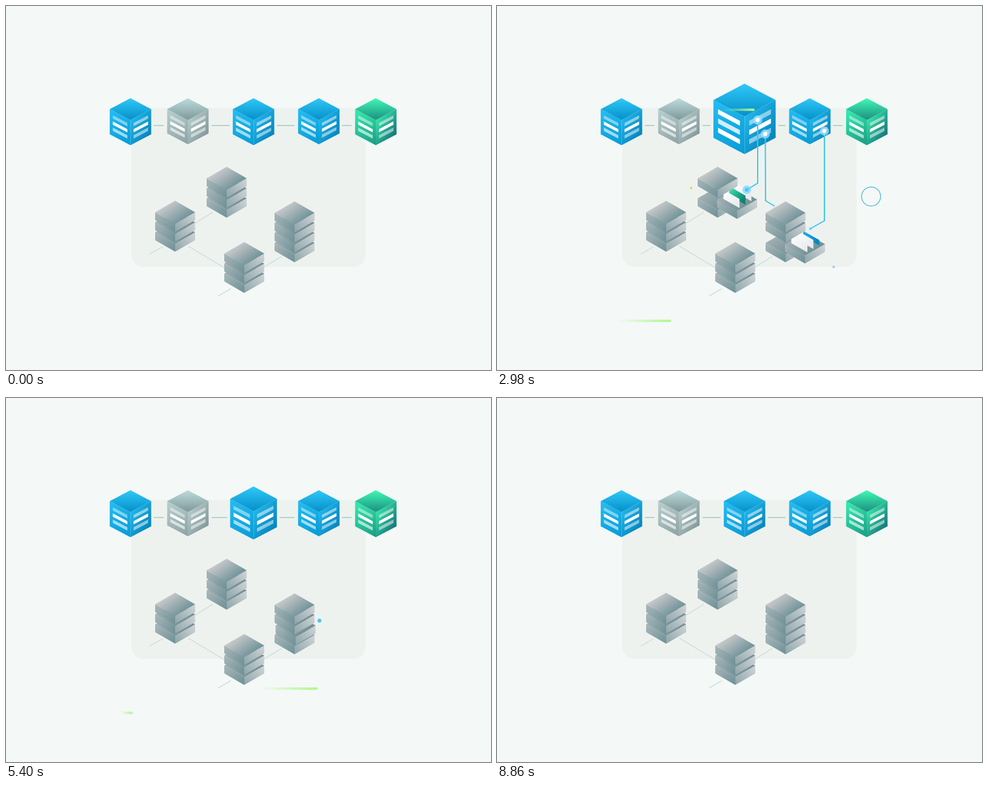
These frames come from a looping animation (800 px wide and 600 px high, 8880 ms). An HTML page with a canvas:

```html
<!DOCTYPE html>
<html lang="en">
<head>
<meta charset="utf-8">
<title>Blocks and storage</title>
<style>
html, body { margin: 0; width: 100%; height: 100%; overflow: hidden; background: #f4f8f7; }
canvas { display: block; width: 800px; height: 600px; }
</style>
</head>
<body>
<canvas id="stage" width="800" height="600"></canvas>
<script>
const ctx = document.getElementById('stage').getContext('2d');
const LOOP = 8880;
const TAU = Math.PI * 2;

const clamp = v => Math.max(0, Math.min(1, v));
const mix = (a, b, k) => a + (b - a) * k;
const ease = v => { const k = clamp(v); return k * k * (3 - 2 * k); };
const step = (t, a, b) => ease((t - a) / (b - a));
const between = (t, inA, inB, outA, outB) => step(t, inA, inB) - step(t, outA, outB);

// Palette entries are [from, to] pairs for each face
const BLUE = { top: ['#2fc8f8', '#058fc9'], left: ['#24bdf3', '#069bd6'], right: ['#22b5ea', '#0584bb'] };
const GRAY = { top: ['#bddcdc', '#7f9898'], left: ['#b9cfcf', '#8da3a4'], right: ['#b4caca', '#83989a'] };
const GREEN = { top: ['#3ff8b5', '#1c8f80'], left: ['#36eeb0', '#1a9c83'], right: ['#35e4a8', '#17747a'] };
const STEEL = { top: ['#cacacc', '#6f9298'], left: ['#a9b7ba', '#6c9096'], right: ['#d2d5d7', '#8da5a9'] };

function poly(points, fill) {
  ctx.beginPath();
  points.forEach(([x, y]) => ctx.lineTo(x, y));
  ctx.closePath();
  ctx.fillStyle = fill;
  ctx.fill();
}

function shade(a, b, [from, to]) {
  const g = ctx.createLinearGradient(a[0], a[1], b[0], b[1]);
  g.addColorStop(0, from);
  g.addColorStop(1, to);
  return g;
}

function line(points, color, width) {
  ctx.beginPath();
  points.forEach(([x, y]) => ctx.lineTo(x, y));
  ctx.strokeStyle = color;
  ctx.lineWidth = width;
  ctx.stroke();
}

function disc(x, y, r, color) {
  if (r <= 0) return;
  ctx.beginPath();
  ctx.arc(x, y, r, 0, TAU);
  ctx.fillStyle = color;
  ctx.fill();
}

function cube(cx, cy, size, height, colors, turn = 0, marks = [[.45, 1, .6], [.5, 1, .5]]) {
  const h = height * size;
  const v = [0, 1, 2, 3].map(i => {
    const a = turn + (i + 1) * Math.PI / 2;
    return [cx + 34.2 * size * Math.cos(a), cy + 18 * size * Math.sin(a)];
  });
  const topY = Math.min(...v.map(p => p[1]));
  const lowY = Math.max(...v.map(p => p[1]));
  v.forEach((b, i) => {
    const a = v[(i + 1) % 4];
    if (a[0] >= b[0] - .01) return;
    const isLeft = a[0] + b[0] < 2 * cx;
    poly([a, b, [b[0], b[1] + h], [a[0], a[1] + h]],
      shade(a, [b[0], b[1] + h], isLeft ? colors.left : colors.right));
    marks[isLeft ? 0 : 1].forEach((alpha, row) => {
      const at = (u, w) => [mix(a[0], b[0], u), mix(a[1], b[1], u) + h * w];
      const y = .18 + row * .245;
      poly([at(.15, y), at(.85, y), at(.85, y + .13), at(.15, y + .13)], `rgba(255,255,255,${alpha})`);
    });
  });
  poly(v, shade([cx, topY], [cx, lowY], colors.top));
}

function slab(cx, y, isLid) {
  const back = [cx, y], left = [cx - 33, y + 19], front = [cx, y + 38], right = [cx + 33, y + 19];
  const down = ([x, py]) => [x, py + 13];
  poly([left, front, down(front), down(left)], shade(left, down(front), STEEL.left));
  poly([front, right, down(right), down(front)], shade(right, down(front), STEEL.right));
  poly([back, right, front, left],
    shade([cx - 13, y + 4], [cx + 10, y + 36], isLid ? STEEL.top : ['#a3b0b2', '#718f95']));
}

function sheet(x, y, rise, colors) {
  const h = 15 * rise;
  if (h < .3) return;
  const base = y + 15;
  poly([[x, base - h], [x + 26.5, base + 15 - h], [x + 26.5, base + 15], [x, base]],
    shade([x, y], [x + 26, y + 18], colors));
}

const WHITE = ['#ffffff', '#e9edee'];
const MINT = ['#38ecae', '#0f8473'];
const AZURE = ['#22b9f2', '#0787c4'];

function server(cx, top, layers, drawer, open = 0, sheets = [], rise = []) {
  for (let i = layers - 1; i >= 0; i--) {
    const k = i === drawer ? open : 0;
    slab(cx + 32 * k, top + 16.5 * i + 18.5 * k, i === 0);
    if (k) {
      for (let j = sheets.length - 1; j >= 0; j--) {
        sheet(cx + 9.5 + j * 9.8 - 32 * (1 - k), top + 38 + 16 * (drawer - 1) - j * 5.6 - 18.5 * (1 - k),
          rise[j], sheets[j]);
      }
    }
  }
}

// Draws the part of a polyline between two fractions of its length
function trim(points, from, to, color) {
  if (to <= from) return;
  const lens = points.slice(1).map((p, i) => Math.hypot(p[0] - points[i][0], p[1] - points[i][1]));
  const total = lens.reduce((a, b) => a + b, 0);
  const a = from * total, b = to * total;
  let run = 0;
  const out = [];
  lens.forEach((len, i) => {
    const s = Math.max(a, run), e = Math.min(b, run + len);
    if (e > s) {
      [s, e].forEach(d => {
        const k = (d - run) / len;
        out.push([mix(points[i][0], points[i + 1][0], k), mix(points[i][1], points[i + 1][1], k)]);
      });
    }
    run += len;
  });
  line(out, color, 2);
}

const LINKS = [
  { pts: [[430, 188], [430, 292], [412, 303]], on: .7, draw: [.9, 1.6], off: [4.1, 4.6], end: true },
  { pts: [[442.5, 211], [443, 321], [458, 330]], on: 1.2, draw: [1.4, 2.1], off: [4.7, 5.2] },
  { pts: [[540, 206], [540, 354], [517, 367]], on: 1.9, draw: [2.1, 2.9], off: [4.95, 5.4], end: true },
  { pts: [[322, 205], [322, 355], [310, 362]], on: 5.5, draw: [5.6, 6.4], off: [7.2, 7.7], end: true, dim: true }
];

function link(t, { pts, on, draw, off, end, dim }) {
  const [sx, sy] = pts[0], [ex, ey] = pts[pts.length - 1];
  trim(pts, step(t, ...off), step(t, ...draw), dim ? '#b4cfd1' : '#3cc6f4');
  const halo = between(t, on, on + .2, off[0], off[0] + .25);
  const core = between(t, on + .15, on + .35, off[0] - .25, off[0]);
  disc(sx, sy, 7.5 * halo, dim ? 'rgba(235,242,242,.75)' : 'rgba(165,225,250,.75)');
  disc(sx, sy, 3.4 * core, '#fff');
  if (!end) return;
  const ring = between(t, draw[1], draw[1] + .2, off[1] - .2, off[1]);
  const dot = between(t, draw[1], draw[1] + .2, off[1] + .1, off[1] + .3);
  disc(ex, ey, 7.2 * ring, dim ? 'rgba(200,220,221,.7)' : 'rgba(110,210,250,.65)');
  disc(ex, ey, 3.2 * dot, dim ? '#a9c5c7' : '#4cc6f8');
}

// y, first x, last x, rgb, start times, length of run
const LIME = '175,248,140', SKY = '110,175,240', AQUA = '130,245,250';
const STREAKS = [
  [479, 290, 525, LIME, [.1, 1.2, 4.75], 1],
  [519, 190, 425, LIME, [.78, 2.65, 5.27], 1],
  [430, 271, 557, SKY, [0, 2.19], .84],
  [171, 190, 425, LIME, [2.21, 4.02], 1],
  [211, 365, 600, LIME, [1.57], 1],
  [59, 300, 535, AQUA, [1.05, 3.58, 6.35], 1],
  [109, 190, 425, SKY, [3.17, 6.14], 1],
  [261, 270, 556, SKY, [1.29, 3.58, 6.2], 1]
];

function streak(t, [y, x0, x1, rgb, starts, span]) {
  starts.forEach(s => {
    const p = (t - s) / span;
    if (p <= 0 || p >= 1) return;
    const tail = mix(x0, x1, ease((p - .25) / .75));
    const head = mix(x0, x1, ease(p / .75));
    if (head - tail < .3) return;
    ctx.fillStyle = shade([tail, 0], [head, 0], [`rgba(${rgb},0)`, `rgb(${rgb})`]);
    ctx.beginPath();
    ctx.roundRect(tail, y - 2, head - tail, 4, [0, 2, 2, 0]);
    ctx.fill();
  });
}

// sides (0 disc, 1 ring), color, start, span, x0, y0, x1, y1, radius, angle, spin
const BITS = [
  [3, '#4df0e6', .55, 2.1, 213, 233, 313, 251, 7, -.85, .44],
  [3, '#5cc9fa', 1.9, .8, 556, 180, 564, 180, 5, 3.14, 0],
  [6, '#3df2b4', 1.8, 1, 564, 372, 564, 357, 7.5, 0, .2],
  [6, '#3df2b4', 4.3, .9, 527, 256, 527, 240, 5.6, .3, .3],
  [6, '#3df2b4', 5.8, .9, 540, 400, 540, 386, 5.2, .52, .2],
  [0, '#3df2b4', 3.3, .9, 547, 356, 547, 348, 4.4],
  [0, '#3df2b4', 3.25, .9, 462, 211, 462, 202, 4.6],
  [0, '#3df2b4', 2.2, .8, 557, 207, 557, 200, 4],
  [0, '#5ccdfb', 3.3, .9, 437, 386, 437, 374, 3.3],
  [0, '#4ce0e4', 3.68, .6, 387, 352, 387, 346, 3],
  [0, '#5ccdfb', 4.3, .9, 473, 227, 473, 213, 3.3],
  [0, '#5ccdfb', 5.8, .9, 469, 206, 469, 194, 4.2],
  [1, '#3cb4da', 1.7, 2.4, 617, 314, 617, 314, 15.7],
  [1, '#3cb4da', 3.4, 1.6, 573.5, 318.6, 573.5, 282.7, 15],
  [1, '#58e8bb', 1.9, .8, 211, 257, 211, 253, 3.7],
  ...[.02, .74, 2.18, 3.2, 5.37, 6.13].map(s => [0, '#dfcd4c', s, .9, 213, 300, 324, 300, 4.2])
];

function bit(t, [sides, color, start, span, x0, y0, x1, y1, radius, angle = 0, spin = 0]) {
  const p = (t - start) / span;
  if (p <= 0 || p >= 1) return;
  const k = ease(p);
  const x = sides === 0 ? mix(x0, x1, k) : mix(x0, x1, p);
  const y = mix(y0, y1, p);
  const r = radius * clamp(Math.min(p, 1 - p) * 4);
  if (sides === 0) return disc(x, y, r, color);
  if (sides === 1) {
    ctx.globalAlpha = clamp(p * 4 - .5);
    ctx.beginPath();
    ctx.arc(x, y, r, 0, TAU);
    ctx.strokeStyle = color;
    ctx.lineWidth = 1.2;
    ctx.stroke();
    ctx.globalAlpha = 1;
    return;
  }
  const a = angle + spin * (t - start);
  poly(Array.from({ length: sides }, (_, i) =>
    [x + r * Math.cos(a + i * TAU / sides), y + r * Math.sin(a + i * TAU / sides)]), color);
}

const CABLES = [[237, 409, 258, 397], [312, 358, 341, 340], [301, 396, 361, 432], [426, 430, 454, 413], [350, 478, 371, 466]];

function bigMarks(t) {
  if (t < .3 || t > 4.5) return undefined;
  return t < 1.2 ? [[1, .2, .2], [.9, 1, .55]] : [[1, .8, 1], [.5, 1, .5]];
}

// Sheets pop up one after another, then sink together
const rises = (t, up, down) => [0, 1, 2].map(i => between(t, up + i * .13, up + i * .13 + .3, down, down + .25));

function draw(t) {
  ctx.fillStyle = '#f4f8f7';
  ctx.fillRect(0, 0, 800, 600);
  ctx.fillStyle = '#eef2ee';
  ctx.beginPath();
  ctx.roundRect(207, 168, 386, 262, 20);
  ctx.fill();

  const grow = 1 + .5 * between(t, .15, .65, 5.1, 5.55);
  const half = 34 * grow;
  [[244, 260], [339, 408 - half - 5], [409 + half + 4, 476], [554, 570]]
    .forEach(([a, b]) => line([[a, 197], [b, 197]], '#a6cdcb', 1.6));
  CABLES.forEach(([a, b, c, d]) => line([[a, b], [c, d]], '#cee3e1', 1.7));

  const open2 = between(t, .25, .65, 4.2, 4.55);
  const open4 = between(t, 2.2, 2.65, 5.1, 5.45);
  const open1 = between(t, 5.45, 5.85, 7.5, 7.9);
  server(364, 265, 3, 1, open2, [WHITE, MINT, WHITE], rises(t, .48, 4.05));
  server(279, 321, 3, 1, open1, [WHITE, MINT], rises(t, 5.7, 7.35));
  server(476, 322, 4, 2, open4, [WHITE, WHITE, AZURE], rises(t, 2.55, 4.95));
  server(393, 389, 3, 1);

  cube(205.3, 170, 1, 41.5, BLUE, step(t, 1.99, 2.94) * Math.PI / 2);
  cube(300, 170, 1, 40, GRAY);
  cube(408.3, 200 - 30 * grow, grow, 41.5, BLUE, 0, bigMarks(t));
  cube(516, 170, 1, 40, BLUE);
  cube(610, 170, 1, 41.5, GREEN);

  LINKS.forEach(l => link(t, l));
  STREAKS.forEach(s => streak(t, s));
  BITS.forEach(b => bit(t, b));
}

const begin = performance.now();
function frame() {
  draw((performance.now() - begin) % LOOP / 1000);
  requestAnimationFrame(frame);
}
frame();
</script>
</body>
</html>
```
